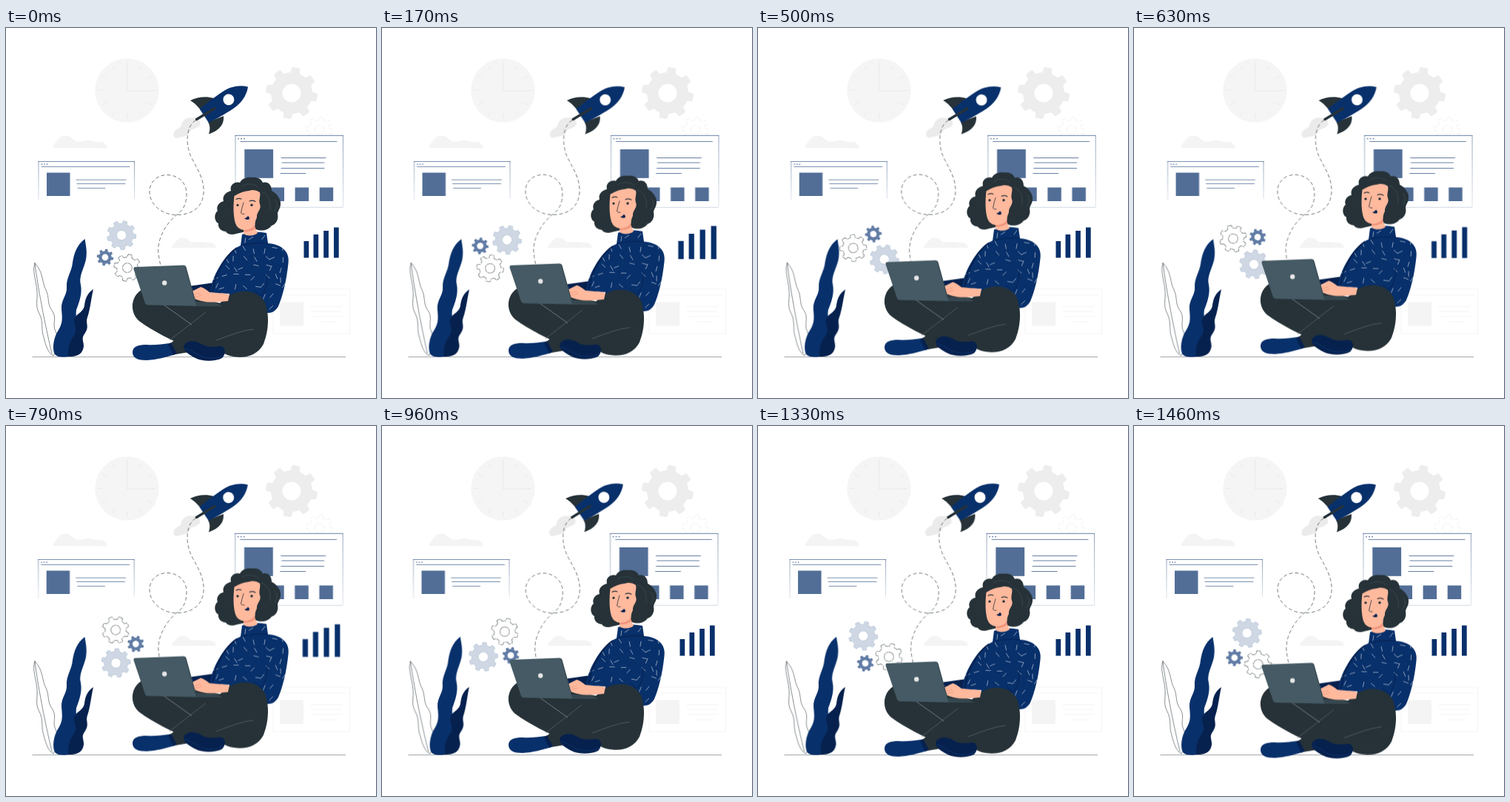
Write an HTML page that moves like this. It is 500x500 px and loops after 1.5 s.

```html
<!DOCTYPE html>
<html lang="en">
<head>
<meta charset="utf-8">
<title>Launch</title>
<style>
  html, body { margin: 0; width: 100%; height: 100%; overflow: hidden; background: #fff; }
  svg { display: block; width: 100vw; height: 100vh; }
  .navy { fill: #08306b; }
  .deep { fill: #06214e; }
  .dark { fill: #263238; }
  .mid { fill: #526e97; }
  .skin { fill: #ffb99d; }
  .line { fill: none; stroke: #08306b; stroke-linecap: round; }
  .ink { fill: none; stroke: #263238; stroke-linecap: round; stroke-linejoin: round; }
  .wind, .spin, .float, .beat, .shake { animation: 1.5s linear infinite; }
  .wind { animation-name: wind; }
  .spin { animation-name: spin; transform-origin: 154px 300.5px; }
  .float { animation-name: float; }
  .beat { animation-name: beat; transform-origin: 426px 290px; }
  .shake { animation-name: shake; animation-timing-function: ease; }
  #plant { transform-origin: 77.5px 365px; }
  #flight { transform-origin: 260px 200px; }
  @keyframes wind { 25% { transform: rotate(1deg); } 75% { transform: rotate(-1deg); } }
  @keyframes spin { to { transform: rotate(360deg); } }
  @keyframes float { 50% { transform: translateY(-10px); } }
  @keyframes beat { 0%, 30%, 40%, 60%, 100% { transform: scale(1); } 10%, 50% { transform: scale(1.1); } }
  @keyframes shake {
    0%, 100% { transform: translateX(0); }
    10%, 90% { transform: translateX(-1px); }
    20%, 80% { transform: translateX(2px); }
    30%, 50%, 70% { transform: translateX(-4px); }
    40%, 60% { transform: translateX(4px); }
  }
</style>
</head>
<body>
<svg viewBox="0 0 500 500">
  <defs>
    <linearGradient id="fade" x1="0" y1="0" x2="0" y2="1">
      <stop offset="0" stop-color="#08306b" stop-opacity=".75"/>
      <stop offset="1" stop-color="#08306b" stop-opacity=".2"/>
    </linearGradient>
    <clipPath id="knit"><use href="#sweater"/></clipPath>
  </defs>

  <!-- backdrop -->
  <circle cx="163.5" cy="84.5" r="43.2" fill="#f5f5f5"/>
  <g id="ticks" stroke="#e3e3e3" stroke-width=".6"></g>
  <path d="M163.5 49V85H199" fill="none" stroke="#e3e3e3" stroke-width=".6"/>
  <path id="cog" transform="translate(386 88)" fill="#ededed" fill-rule="evenodd"/>
  <path id="ghost" transform="translate(423.5 138)" fill="none" stroke="#e8e8e8" stroke-width=".6" stroke-dasharray="6 2"/>
  <path d="M64 162C64 157 68 154 70 151C74 145 84 143 90 150C95 155 99 153 105 153C111 150 118 153 122 154C131 152 137 157 136.500 162.500Z" fill="#f4f4f4"/>
  <path d="M224 297C224 293 228 291 229 289C233 282 243 282 247 287C251 291 255 289 259 289C264 288 268 290 271 290C279 289 284 293 283.500 297Z" fill="#f4f4f4"/>
  <g fill="none" stroke="#efefef" stroke-width=".7">
    <rect x="361" y="353" width="103.500" height="60"/>
    <path d="M365 361H460M411 376.500H455M413 383H453M411 390H455M425 397H447"/>
  </g>
  <rect x="370" y="370.500" width="32" height="32" fill="#f4f4f4"/>
  <path d="M35.500 444.500H459" stroke="#7b8388" stroke-width=".7"/>

  <!-- browser windows -->
  <g class="shake">
    <path d="M43.700 180h.6v53h-.6zM173.200 180h.6v51h-.6z" fill="url(#fade)"/>
    <g class="line" stroke-width=".8" opacity=".65">
      <path d="M44 180.500H173.500M48 187.500H167"/>
      <path d="M95 205.200H162M96 210.500H161M97 216.400H134"/>
      <path d="M48.500 184h.01M52 184h.01M55.500 184h.01" stroke-width="1.700"/>
    </g>
    <rect class="mid" x="55" y="195.500" width="31.500" height="31.500"/>

    <rect x="310" y="145.300" width="145.300" height="97" fill="#fff"/>
    <path d="M309.700 145h.6v97h-.6zM455 145h.6v97h-.6z" fill="url(#fade)"/>
    <path class="line" d="M312 242.300H455" stroke-width=".6" opacity=".3"/>
    <g class="line" stroke-width=".9" opacity=".68">
      <path d="M310 145.300H455.300M317 153.400H447"/>
      <path d="M372 175.500H432M373 182H430M372 189.500H430M371 196.500H405"/>
      <path d="M314 149.600h.01M318 149.600h.01M322 149.600h.01" stroke-width="1.800"/>
    </g>
    <rect class="mid" x="322.300" y="164" width="38.800" height="38.800"/>
    <path class="mid" d="M357.500 215.600h18.500v18.500h-18.500zM390.600 215.600h18.500v18.500h-18.500zM423.700 215.600h18.500v18.500h-18.500z"/>
  </g>

  <path class="navy beat" d="M402.500 288h6.700v22.500h-6.700zM415.500 279h6.700v31.500h-6.700zM429.200 274h6.700v36.500h-6.700zM443 269.500h6.700v41h-6.700z"/>

  <!-- rocket and trail -->
  <g id="flight" class="wind">
    <path d="M226.500 146C225 140 231 136 236 134C237 124 246 119 252 122C258 119 264 126 262 131C258 136 252 136 250 138C248 145 241 147 236 147C232 150 228 149 226.500 146Z" fill="#ebebeb"/>
    <path class="ink" stroke-width=".65" stroke-dasharray="4 4" d="M256 125C243 133 242 158 251 176C260 193 268 205 267 223C265 247 245 253 229 252.500C210 252 194 238 194 221C194 208 204 198.500 218 198.500C233 199 244 209 244 224C244 240 238 247 230 253C212 268 204 290 206 305Q207 313 209 321"/>
    <path class="dark" d="M281 95C271 92 258 93 249 98C256 102 260 107 264 112ZM294 119C295 130 289 138 274 143.500C276 137 276 132 273 127Z"/>
    <g transform="translate(327 79.500) rotate(-33.500)">
      <path class="navy" d="M0 0C-8 -9 -20 -13.500 -32 -13.500C-48 -13.500 -60 -12.500 -71 -11V11C-60 12.500 -48 13.500 -32 13.500C-20 13.500 -8 9 0 0Z"/>
      <circle cx="-31.300" r="7.500" fill="#fff"/>
      <path d="M-71 -11V11" stroke="#7088a8" stroke-width=".5"/>
    </g>
    <path class="ink" d="M257.500 123.500L282 108.500" stroke-width="3.300"/>
  </g>

  <!-- small gears -->
  <g class="spin">
    <path id="gearA" transform="translate(156 280)" fill="#ced7e3" stroke="#9fb0c8" stroke-width=".5" fill-rule="evenodd"/>
    <path id="gearB" transform="translate(134 310)" fill="#617ca5" fill-rule="evenodd"/>
    <path id="gearC" transform="translate(164 324)" fill="#fff" stroke="#263238" stroke-width=".6" stroke-dasharray="9 1" fill-rule="evenodd"/>
  </g>

  <!-- plant -->
  <g id="plant" class="wind">
    <path class="ink" stroke-width=".55" d="M39 318C35 328 41 342 42 356C43 368 39 375 45 386C51 397 47 408 51 418C54 430 57 439 64 443C70 432 71 420 67 410C62 400 69 393 63 383C55 373 59 364 54 354C48 343 51 330 39 318ZM39 318C43 350 52 398 62 440"/>
    <path class="navy" d="M106.500 285C96 293 92 304 90 317C89 329 81 338 82 350C83 361 74 367 75 380C76 392 77 398 71 408C64 418 62 434 66 441Q70 446 84 444C98 438 93 423 96 413C100 404 93 392 95 381C100 368 103 358 101 347C98 336 105 326 108 313C110 302 108 294 106.500 285Z"/>
    <path class="deep" d="M118 353C109 359 107 367 106 375C104 386 92 386 92 397C93 406 97 408 91 417C84 426 84 435 84 444C98 445 104 439 105 430C105 422 101 420 107 412C113 403 107 399 110 391C114 380 115 365 118 353Z"/>
  </g>

  <!-- woman -->
  <g class="float">
    <path class="deep" d="M250 348.500L282 344L292 362L254 360Z"/>
    <path id="sweater" class="navy" d="M319 279Q335 273 352 277L354 291C372 292 384 302 381.500 318C379 342 374 362 368 376C362 387 350 389 338 376L300 369L302 359L276 358C276 350 280 336 290 320C299 306 307 298 317 294Z"/>
    <g id="stitches" clip-path="url(#knit)" stroke="#c3cedd" stroke-width=".7" stroke-linecap="round"></g>
    <path d="M312 297C299 306 289 324 283 339L279 356" fill="none" stroke="#06214e" stroke-width="1.800"/>
    <path d="M317 294Q335 289 354 291M353 333C353 345 352 355 344 362L336 355" fill="none" stroke="#06214e" stroke-width=".9"/>

    <path class="dark" d="M332 202C340 201 345 204 347 209C354 207 359 212 359 220C366 223 372 232 371 238C371 244 367 247 367 251C369 259 364 266 359 267C354 274 344 275 338 272L311 278C306 280 299 279 297 275C292 275 286 271 287 264C282 262 280 252 286 247C284 243 286 236 294 234C292 228 296 222 304 220C302 213 308 207 316 209C319 203 326 201 332 202Z"/>
    <path class="skin" d="M308.500 227C307 240 307 254 310 264Q313 272 321 273V278C327 282 336 281 340 277L336 268C340 260 343 255 342 248C347 240 345 229 343 222Q336 217 328 220Q318 221 308.500 227Z"/>
    <path d="M321 273Q331 273 336 267L337 270Q332 276 321 275Z" fill="#f0937a"/>
    <path class="dark" d="M343 219C345 226 341 232 343 238C346 245 338 249 339 256C336 262 336 267 338 272L354 268L362 240L350 216Z"/>
    <path class="ink" d="M311 231.500Q314 229.500 318 231M329 234Q333 232 337 234.500" stroke-width="1.100"/>
    <path class="ink" d="M321 236Q318.500 244 317.500 250Q319 252 322 251.500" stroke-width=".8"/>
    <g class="dark"><circle cx="313" cy="239.300" r="1.600"/><circle cx="332" cy="239.300" r="1.700"/></g>
    <path class="deep" d="M322 257.500Q325 257 327 254Q329 255 329 258Q326 260 322 257.500Z"/>
    <path d="M345 221Q359 226 357 246M363 232Q370 238 363 248M318 214Q330 207 341 215" fill="none" stroke="#46535a" stroke-width=".6"/>

    <path class="dark" d="M186 352C167 362 167 385 180 396C200 411 225 422 246 432L276 428L305 400L290 372L250 362Z"/>
    <path d="M213 374L251 401" stroke="#8f9a9f" stroke-width=".7"/>
    <path class="dark" d="M220 428L296 366C312 351 340 352 350 371C357 390 354 412 348 427C341 441 326 446 312 444.500C300 444 290 438 284 432L229 441Z"/>
    <path d="M221 422L270 384M284 422Q300 416 312 412T335 407" fill="none" stroke="#5d6a70" stroke-width=".7"/>

    <path d="M240 369L284 371L292 376H257Z" fill="#37474f"/>
    <path class="skin" d="M249 357L263 350Q266 350 275 357L302 359.500L300 369L283 370.500C270 371 258 369 251 363Z"/>
    <path d="M253 361L263 358M255 364L265 361" stroke="#ee8f78" stroke-width=".6"/>
    <path d="M174 323L240 320.500Q242.500 320.500 243.500 323L258 375.700L191 374.300Q189 374 188 372L172.500 326Q172 323.500 174 323Z" fill="#455a64"/>
    <path d="M242 321.500L257.500 375.700" stroke="#34444c" stroke-width=".8"/>
    <circle cx="214.200" cy="344.500" r="3.200" fill="#e6e6e6"/>

    <path class="navy" d="M171 438C171 430 180 428 190 428C201 429 212 427 221 426L229 441C215 445 205 448 190 449C178 449 171 446 171 438Z"/>
    <path class="deep" d="M219 427.500L223 425L231 440L226 442Z"/>
    <path class="deep" d="M240 431C242 422 255 421 264 427C272 433 284 430 291 430C298 433 297 441 292 446C282 451 266 451 256 446C248 442 240 437 240 431Z"/>
    <path d="M241 433C254 435 259 445 274 446Q287 447 294 442" fill="none" stroke="#123c78" stroke-width=".7"/>
  </g>
</svg>
<script>
  const $ = id => document.getElementById(id);
  const polar = (r, a) => (r * Math.cos(a)).toFixed(2) + ' ' + (r * Math.sin(a)).toFixed(2);

  function gear(id, teeth, outer, root, hole, phase = 0) {
    const step = 2 * Math.PI / teeth;
    let d = '';
    for (let i = 0; i < teeth; i++) {
      const a = phase * Math.PI / 180 + i * step;
      d += (i ? 'L' : 'M') + polar(root, a - step * .3) + 'L' + polar(outer, a - step * .19) +
        `A${outer} ${outer} 0 0 1 ` + polar(outer, a + step * .19) + 'L' + polar(root, a + step * .3) +
        `A${root} ${root} 0 0 1 ` + polar(root, a + step * .7);
    }
    d += `ZM${hole} 0A${hole} ${hole} 0 1 0 ${-hole} 0A${hole} ${hole} 0 1 0 ${hole} 0Z`;
    $(id).setAttribute('d', d);
  }

  function segment(parent, x, y, dx, dy) {
    const path = document.createElementNS('http://www.w3.org/2000/svg', 'path');
    path.setAttribute('d', `M${x} ${y}l${dx} ${dy}`);
    $(parent).append(path);
  }

  gear('cog', 8, 35, 28, 12.5, 10);
  gear('ghost', 8, 18, 14, 6.5, 8);
  gear('gearA', 9, 19.6, 15.8, 6.7, 5);
  gear('gearB', 8, 11.3, 8.6, 4.4, 10);
  gear('gearC', 8, 18.2, 14.3, 6.4, 12);

  for (let i = 0; i < 12; i++) {
    const a = i * Math.PI / 6, c = Math.cos(a), s = Math.sin(a);
    segment('ticks', 163.5 + 32 * c, 84.5 + 32 * s, 7 * c, 7 * s);
  }

  // scattered stitches on a jittered grid
  let seed = 7;
  const rand = () => (seed = seed * 16807 % 2147483647) / 2147483647;
  for (let y = 280; y < 385; y += 13) {
    for (let x = 280; x < 384; x += 13) {
      const a = rand() * Math.PI, jx = rand() * 7, jy = rand() * 6;
      segment('stitches', x + jx, y + jy, 6.5 * Math.cos(a), 6.5 * Math.sin(a));
    }
  }
</script>
</body>
</html>
```
